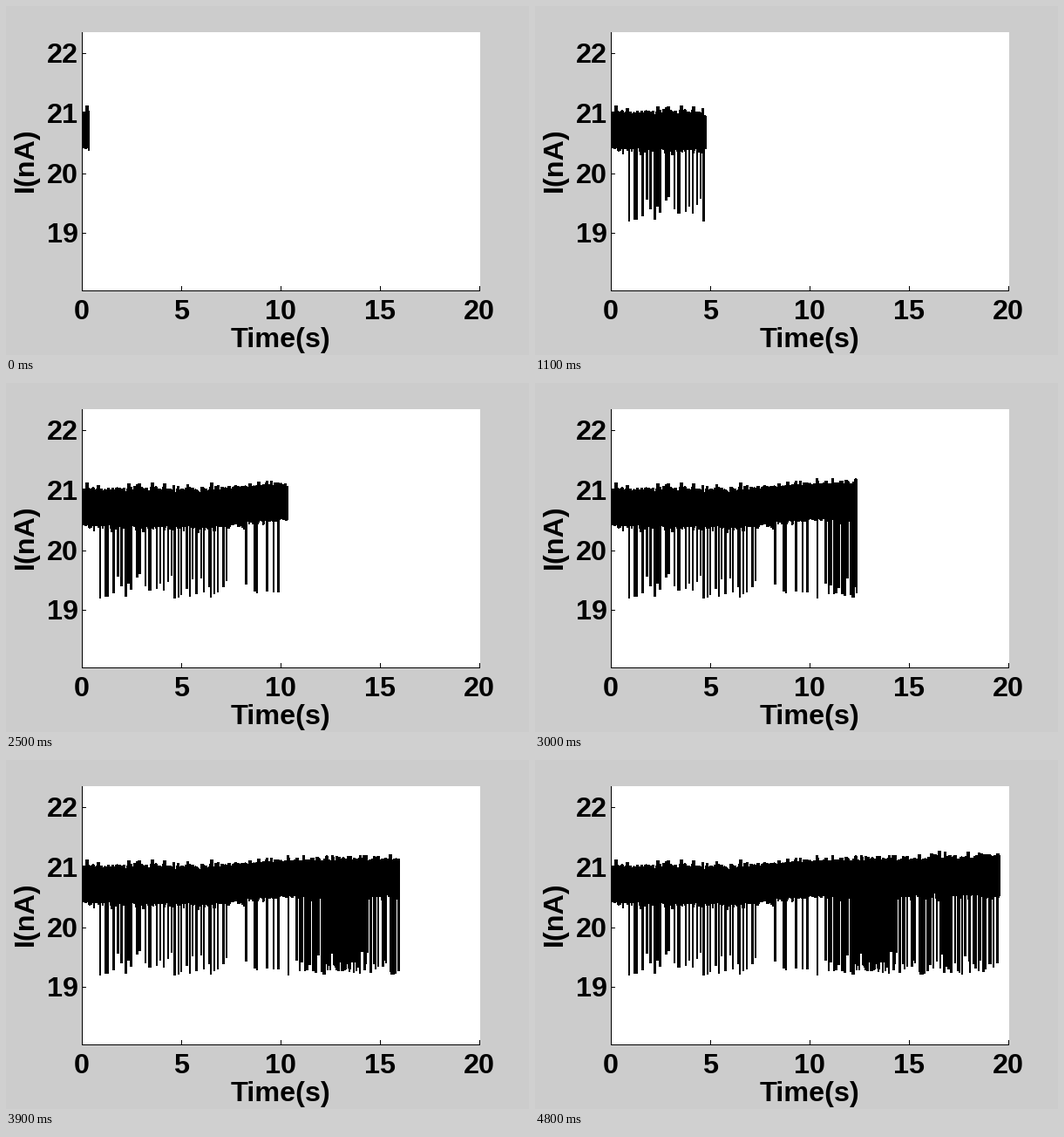
A matplotlib script that plays this animation: 600 by 400 pixels, repeating every 4.9 s.

```python
import matplotlib.pyplot as plt
import numpy as np
from matplotlib.animation import FuncAnimation
from matplotlib.patches import Rectangle

W, H, DPI = 600, 400, 100
FRAMES, STEP_MS = 49, 100
LEFT, RIGHT, TOP, BOTTOM = 87, 544, 30, 326
PX_PER_S = 22.8
S_PER_FRAME = 0.4
FONT_PX = 32.4

plt.rcParams["path.simplify"] = False
plt.rcParams["font.family"] = "Liberation Sans"


def px(n):
    """Pixels to points."""
    return n * 72 / DPI


def make_trace():
    """Noisy current band with random downward blockades, in stage pixels."""
    rng = np.random.default_rng(12)
    x = np.arange(LEFT + 1, RIGHT - 10, 0.5)
    t = (x - LEFT) / PX_PER_S

    def noise():
        return np.clip(rng.gumbel(0, 1.9, x.size), -3, 11) - 4.2

    # Slow drift of both band edges
    knots = [0, 6.5, 10, 20]
    top = np.interp(t, knots, [121, 121, 115, 109]) - noise()
    low = np.interp(t, knots, [165, 168, 158, 157]) + noise()

    # Blockade rate per stretch: start s, end s, count
    for start, end, count in [(0.9, 7.4, 34), (8.1, 10.5, 7),
                              (10.8, 12.3, 12), (12.3, 14.1, 32),
                              (14.1, 19.6, 42)]:
        when = start + (end - start) * (np.arange(count) + rng.random(count)) / count
        low[np.searchsorted(t, when)] = 247 - rng.gamma(2, 5.5, count)

    # One long blockade leaves a gap in the band
    held = np.abs(t - 15.636) < 0.06
    top[held], low[held] = 215, 246

    return np.repeat(x, 3), np.column_stack([top, low, top]).ravel()


fig = plt.figure(figsize=(W / DPI, H / DPI), dpi=DPI, facecolor="#cccccc")
ax = fig.add_axes([0, 0, 1, 1])
ax.set_xlim(0, W)
ax.set_ylim(H, 0)
ax.axis("off")


def box(x, y, w, h, color="black", z=3):
    ax.add_patch(Rectangle((x, y), w, h, fc=color, lw=0,
                           antialiased=False, zorder=z))


def label(x, y, s, **kw):
    ax.text(x, y, s, fontsize=px(FONT_PX), fontweight="bold",
            va="baseline", rotation_mode="anchor", **kw)


box(LEFT, TOP, RIGHT - LEFT, BOTTOM - TOP, "white", 0)
box(LEFT, TOP, 1, BOTTOM - TOP + 1)
box(LEFT, BOTTOM, RIGHT - LEFT, 1)

for sec in range(0, 21, 5):
    x = LEFT + round(sec * PX_PER_S)
    box(x, BOTTOM - 5, 1, 5)
    label(x - 9 * len(str(sec)), 359, str(sec))

for amp in range(19, 23):
    y = round(54.3 + 68.6 * (22 - amp))
    box(LEFT, y, 5, 1)
    label(47, y + 11, str(amp))

label(315.2, 391, "Time(s)", ha="center")
label(31, 176.5, "I(nA)", ha="center", rotation=90)

xs, ys = make_trace()
trace, = ax.plot([], [], color="black", lw=px(2), antialiased=False,
                 solid_joinstyle="bevel", solid_capstyle="butt", zorder=2)


def update(i):
    end = LEFT + PX_PER_S * S_PER_FRAME * (i + 1)
    n = np.searchsorted(xs, end - 0.7)
    trace.set_data(xs[:n], ys[:n])
    return trace,


anim = FuncAnimation(fig, update, frames=FRAMES, interval=STEP_MS,
                     repeat=True, repeat_delay=0)
plt.show()
```
